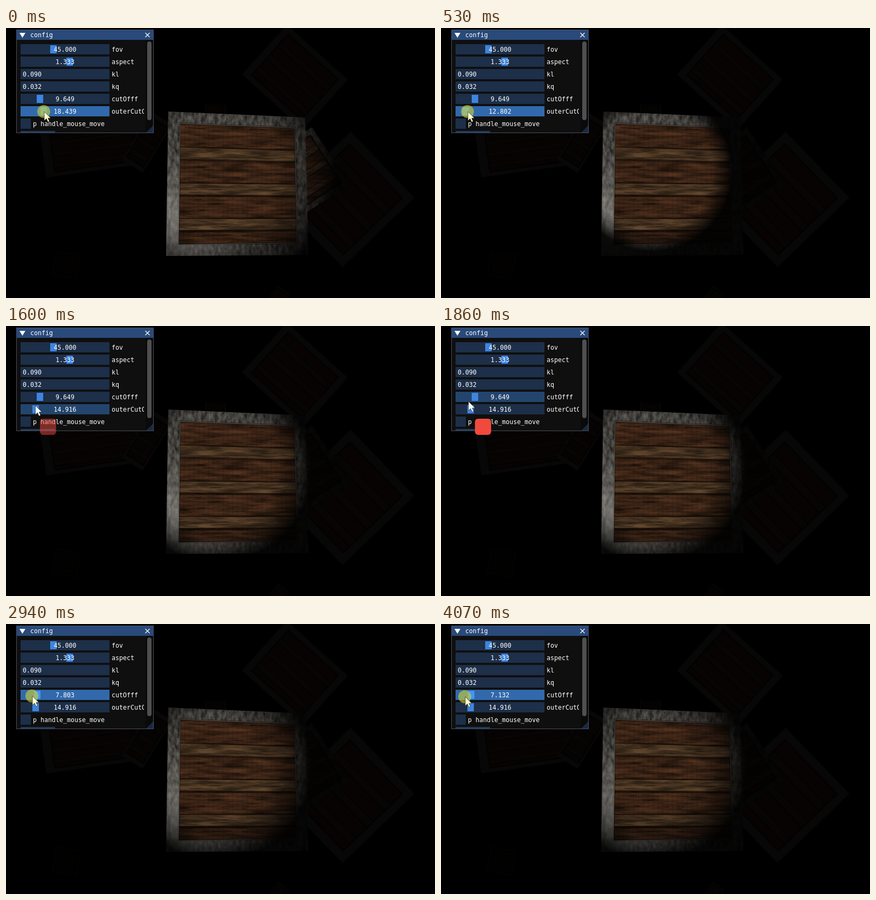
These frames come from a looping animation (796x501 px, 4.15 s). An HTML page:

```html
<!DOCTYPE html>
<html lang="en">
<head>
<meta charset="utf-8">
<title>Spotlight config</title>
<style>
  html, body { margin: 0; width: 100%; height: 100%; overflow: hidden; background: #000; }
  svg { display: block; width: 796px; height: 501px; }
  text { font: 11.63px "DejaVu Sans Mono", monospace; fill: #fff; white-space: pre; }
</style>
</head>
<body>
<svg viewBox="0 0 796 501">
  <defs>
    <filter id="grain" x="0" y="0" width="1" height="1" color-interpolation-filters="sRGB">
      <feTurbulence type="fractalNoise" baseFrequency=".02 .16" numOctaves="4" seed="7"/>
      <feColorMatrix values="0 0 0 0 0  0 0 0 0 0  0 0 0 0 0  1 0 0 0 -.2"/>
      <feComposite in2="SourceAlpha" operator="in"/>
    </filter>
    <filter id="rust" x="0" y="0" width="1" height="1" color-interpolation-filters="sRGB">
      <feTurbulence type="fractalNoise" baseFrequency=".16 .08" numOctaves="4" seed="3"/>
      <feColorMatrix values="0 0 0 0 0  0 0 0 0 0  0 0 0 0 0  1 0 0 0 -.15"/>
      <feComposite in2="SourceAlpha" operator="in"/>
    </filter>
    <radialGradient id="gleam" gradientUnits="userSpaceOnUse" cx="308" cy="375" r="150">
      <stop offset="0" stop-color="#f0efe6" stop-opacity=".36"/>
      <stop offset="1" stop-color="#f0efe6" stop-opacity="0"/>
    </radialGradient>
    <radialGradient id="spot" gradientUnits="userSpaceOnUse" cx="0" cy="0" r="1"
      gradientTransform="translate(392 265) scale(655)"/>
    <mask id="beam" maskUnits="userSpaceOnUse" x="0" y="0" width="796" height="501"
      style="mask-type: alpha"><rect width="796" height="501" fill="url(#spot)"/></mask>
    <clipPath id="panelClip"><rect x="20" y="22" width="236" height="172"/></clipPath>
  </defs>
  <g id="dim"></g>
  <g id="lit" mask="url(#beam)"></g>
  <g id="panel"></g>
  <rect id="badge" x="63" y="172" width="30" height="30" rx="6" fill="#f04a3e"/>
  <circle id="press" r="12" fill="#d4d42e" fill-opacity=".6"/>
  <path id="cursor" d="M0 0V17L4 13.3 6.8 19.5 9.6 18.3 6.9 12.2H12Z" stroke="#222" stroke-width=".7"/>
</svg>
<script>
const $ = id => document.getElementById(id);
const set = (el, attrs) => { for (const k in attrs) el.setAttribute(k, attrs[k]); return el; };

function add(parent, tag, attrs, text) {
  const el = set(document.createElementNS('http://www.w3.org/2000/svg', tag), attrs);
  if (text !== undefined) el.textContent = text;
  parent.append(el);
  return el;
}

let seed = 41;
function rand(a, b) {
  seed = (seed * 16807) % 2147483647;
  return a + (b - a) * seed / 2147483647;
}

/* ---------- crates ---------- */
const dim = $('dim'), lit = $('lit');
const poly = pts => 'M' + pts.map(p => p.join(' ')).join('L') + 'Z';

// Bilinear map from the unit square to a quad given clockwise from top left.
const mapper = ([a, b, c, d]) => (u, v) => [0, 1].map(i =>
  (a[i] * (1 - u) + b[i] * u) * (1 - v) + (d[i] * (1 - u) + c[i] * u) * v);

function turned(cx, cy, w, h, deg) {
  const a = deg * Math.PI / 180, cos = Math.cos(a), sin = Math.sin(a);
  return [[-1, -1], [1, -1], [1, 1], [-1, 1]].map(([sx, sy]) => {
    const x = sx * w / 2, y = sy * h / 2;
    return [cx + x * cos - y * sin, cy + x * sin + y * cos];
  });
}

function cracks(at, count, v0, v1) {
  let d = '';
  for (let i = 0; i < count; i++) {
    const u = rand(0, .9), v = rand(v0 + .01, v1 - .01), end = Math.min(u + rand(.03, .18), 1);
    d += 'M' + at(u, v) + 'Q' + at((u + end) / 2, v + rand(-.012, .012)) + ' ' + at(end, v + rand(-.006, .006));
  }
  return d;
}

function crate(parent, outer, inner, opacity = 1) {
  const rim = mapper(outer), wood = mapper(inner);
  const detailed = parent === lit;
  add(dim, 'path', { d: poly(outer) });
  const g = add(parent, 'g', { opacity, fill: 'none' });
  const face = (d, fill, filter) => {
    add(g, 'path', { d, fill });
    if (detailed) add(g, 'path', { d, filter: `url(#${filter})`, fill: '#000' });
  };
  const lines = (d, stroke, alpha, width) =>
    add(g, 'path', { d, stroke, 'stroke-opacity': alpha, 'stroke-width': width });

  face(poly(outer), '#66635d', 'rust');
  let scratches = '';
  for (let i = 0; detailed && i < 120; i++) {
    scratches += `M${rim(rand(.01, .97), rand(.01, .97))}l${rand(-5, 8)} ${rand(-3, 5)}`;
  }
  lines(scratches, '#1a1917', .4, .8);
  face(poly(inner), '#54331f', 'grain');

  let seams = '';
  for (let i = 1; i < 24; i++) seams += 'M' + wood(i / 24, 0) + 'L' + wood(i / 24, 1);
  lines(seams, '#000', .16, 1);
  lines(cracks(wood, detailed ? 70 : 12, 0, 1), '#0b0603', .6, 1);

  for (let i = 0; i < 3; i++) {
    const top = .2 + i * .295, bottom = top + .09;
    const band = (a, b) => poly([wood(0, a), wood(1, a), wood(1, b), wood(0, b)]);
    add(g, 'path', { d: band(top - .012, bottom + .02), fill: '#000', 'fill-opacity': .5 });
    face(band(top, bottom), '#65492f', 'grain');
    lines(cracks(wood, detailed ? 12 : 3, top, bottom), '#1a0f07', .55, .9);
  }
  lines(poly(inner), '#000', .6, 3);
  return g;
}

function boxFace(parent, opacity, ...place) {
  const quad = turned(...place), at = mapper(quad);
  crate(parent, quad, [at(.09, .09), at(.91, .09), at(.91, .91), at(.09, .91)], opacity);
}

const FAINT = .075;
boxFace(dim, FAINT / 3, 112, 440, 48, 48, 10);
boxFace(dim, FAINT, 507, 497, 26, 28, 38);
boxFace(dim, FAINT, 536, 91, 152, 124, 42);
boxFace(dim, FAINT, 389, 150, 38, 16, 2);
boxFace(dim, FAINT, 163, 222, 190, 85, -8);
boxFace(dim, FAINT, 262, 212, 45, 105, 32);
boxFace(dim, FAINT, 632, 318, 170, 185, 46);
boxFace(lit, .9, 552, 270, 120, 127, -33);

const rimQuad = [[301, 155], [555, 166], [561, 421], [297, 423]];
const woodQuad = [[323, 177], [536, 185], [540, 399], [320, 402]];
const front = crate(lit, rimQuad, woodQuad);
add(front, 'path', { d: poly(rimQuad) + poly(woodQuad), 'fill-rule': 'evenodd', fill: 'url(#gleam)' });
add(front, 'path', { d: poly(woodQuad), stroke: '#b5b1a6', 'stroke-opacity': .5 });

/* ---------- config panel ---------- */
const panel = $('panel');
const FRAME = '#1d2f49', HOVER = '#23456d', ACTIVE = '#3169ac';
const rect = (x, y, width, height, fill, parent = panel, extra) =>
  add(parent, 'rect', { x, y, width, height, fill, ...extra });
const label = (x, y, s, parent = panel, anchor = 'start') =>
  add(parent, 'text', { x, y, 'text-anchor': anchor }, s);

rect(19.5, 3.5, 254, 191, '#0f0f0f', panel, { stroke: '#4a4f5c' });
rect(20, 4, 253, 18, '#294a7a');
add(panel, 'path', { d: 'M25 9H36L30.5 18Z', fill: '#fff' });
label(45, 17, 'config');
add(panel, 'path', { d: 'M258.5 9l8 8m0-8l-8 8', stroke: '#fff', 'stroke-width': 1.2 });
rect(259, 22, 14, 172, '#0a0a0a');
rect(262, 25, 8, 146, '#4f4f4f', panel, { rx: 4 });
add(panel, 'path', { d: 'M273 181V194H260Z', fill: '#182a44' });

const body = add(panel, 'g', { 'clip-path': 'url(#panelClip)' });
let rowY = 30;
function row(name, value, grabX) {
  const frame = rect(27, rowY, 165, 19, FRAME, body);
  const grab = grabX && rect(grabX, rowY + 2, 12, 15, '#3d85e0', body);
  const text = grab ? label(109.5, rowY + 14, value, body, 'middle') : label(31, rowY + 14, value, body);
  label(196, rowY + 14, name, body);
  rowY += 23;
  return { frame, grab, text };
}
row('fov', '45.000', 82);
row('aspect', '1.333', 112);
row('kl', '0.090');
row('kq', '0.032');
const cutRow = row('cutOfff', '', 57);
const outerRow = row('outerCutOff', '', 65);
rect(27, rowY, 19, 19, FRAME, body);
label(50, rowY + 14, 'p handle_mouse_move', body);
rect(27, rowY + 23, 64, 3, '#1f3a60', body);

function setSlider({ frame, grab, text }, value, min, max, state) {
  text.textContent = value.toFixed(3);
  set(frame, { fill: state });
  set(grab, {
    x: 29 + Math.floor(149 * (value - min) / (max - min)),
    fill: state === ACTIVE ? '#4296fa' : '#3d85e0'
  });
}

/* ---------- spotlight ---------- */
const AMBIENT = .08, STOPS = 24;
const stops = Array.from({ length: STOPS + 1 }, (_, i) =>
  add($('spot'), 'stop', { offset: i / STOPS, 'stop-color': '#fff' }));

function setSpot(cut, outer) {
  const rad = Math.PI / 180, reach = Math.tan(outer * rad);
  const cosCut = Math.cos(cut * rad), cosOuter = Math.cos(outer * rad);
  set($('spot'), { r: reach });
  stops.forEach((stop, i) => {
    const cos = Math.cos(Math.atan(reach * i / STOPS));
    const light = Math.max(0, Math.min(1, (cos - cosOuter) / (cosCut - cosOuter)));
    set(stop, { 'stop-opacity': AMBIENT + (1 - AMBIENT) * light });
  });
}

/* ---------- motion: key points as [step, value] ---------- */
const LOOP = 4150, STEP = 266.7, LAST = 4070;
const RELEASE = 6, GRAB = 9;
const pointerX = [[0, 70], [2, 49], [4, 54], [5, 58], [7, 51], [9, 59], [11, 48], [14, 34], [16, 44]];
const pointerY = [[5, 155], [7, 140], [9, 133], [16, 135]];
const outerCut = [[0, 18.439], [2, 12.802], [4, 13.741], [5, 14.916]];
const innerCut = [[9, 9.649], [11, 7.803], [14, 3.776], [16, 7.132]];

function along(track, step) {
  const next = track.findIndex(([s]) => s >= step);
  if (next < 0) return track.at(-1)[1];
  if (next === 0) return track[0][1];
  const [s0, a] = track[next - 1], [s1, b] = track[next];
  return a + (b - a) * (step - s0) / (s1 - s0);
}

let shown;
function render(time) {
  const step = time >= LAST ? 16 : Math.floor((time + 7) / STEP);
  if (step === shown) return;
  shown = step;
  const x = along(pointerX, step), y = along(pointerY, step);
  const cut = along(innerCut, step), outer = along(outerCut, step);
  const pressed = step < RELEASE || step >= GRAB;
  const state = pressed ? ACTIVE : HOVER;
  setSlider(cutRow, cut, 0, 50, y < 144 ? state : FRAME);
  setSlider(outerRow, outer, 10, 45, y < 144 ? FRAME : state);
  setSpot(cut, outer);
  set($('badge'), { opacity: Math.max(0, 1 - Math.abs(step - 7) / 2) });
  set($('press'), { transform: `translate(${x} ${y})`, opacity: +pressed });
  set($('cursor'), { transform: `translate(${x + pressed} ${y})`, fill: pressed ? '#ffffd0' : '#fff' });
}

const start = performance.now();
function tick() {
  render((performance.now() - start) % LOOP);
  requestAnimationFrame(tick);
}
tick();
</script>
</body>
</html>
```
